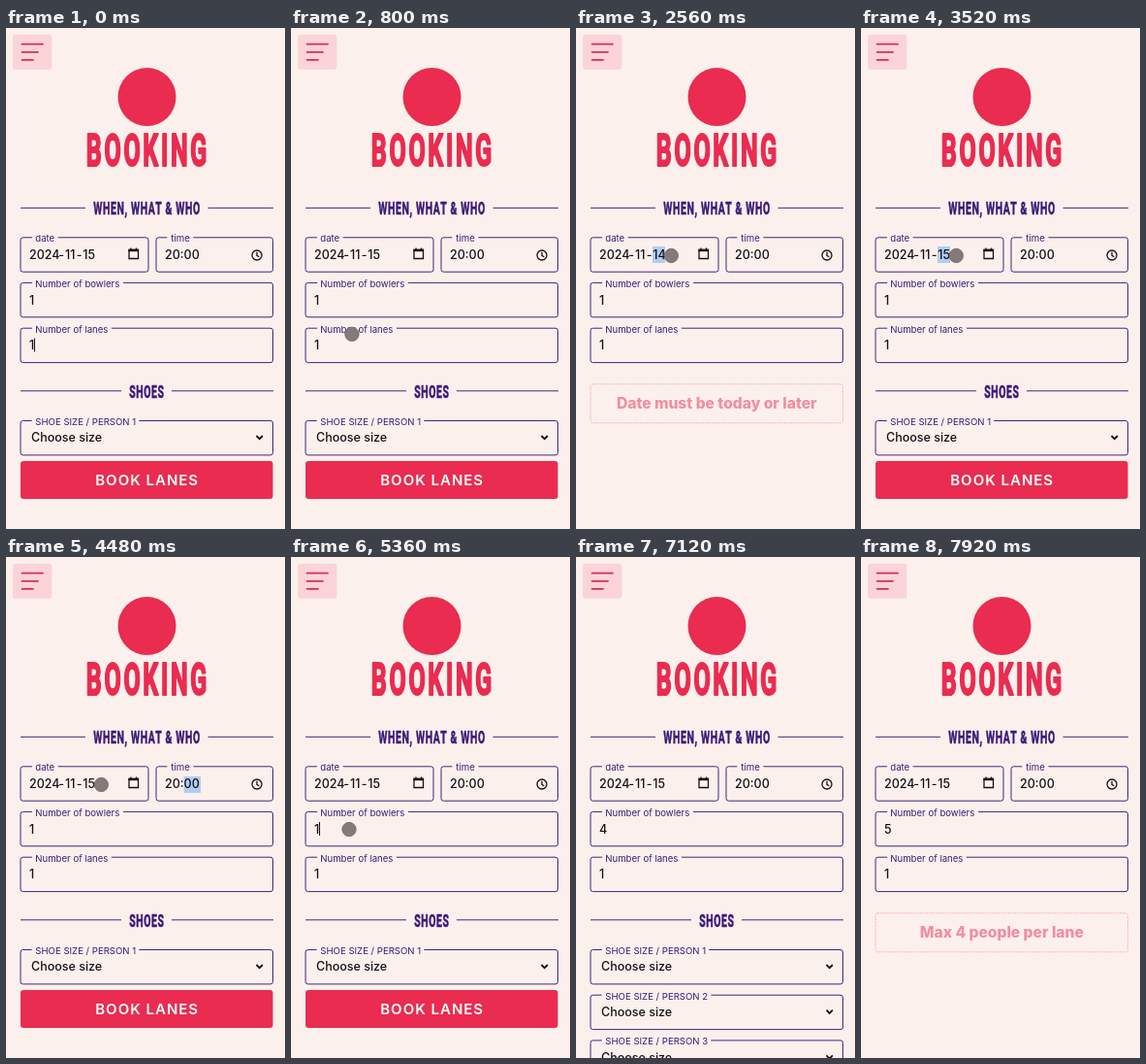
Write an HTML page that moves like this. It is 288 px wide and 516 px high and loops after 8 s.

```html
<!DOCTYPE html>
<html lang="en">
<head>
<meta charset="utf-8">
<title>Booking form</title>
<style>
  html, body { margin: 0; width: 100%; height: 100%; overflow: hidden; background: #fcf0ec; }
  svg { display: block; width: 288px; height: 516px; font-family: Inter, "Open Sans", sans-serif; }
  .heading { font-family: Roboto, "Liberation Sans", sans-serif; font-weight: 700; font-kerning: none; text-anchor: middle; }
  .heading text { vector-effect: non-scaling-stroke; stroke-linejoin: round; }
  .line { fill: none; stroke: #43237a; stroke-width: 1; }
  .label { font-size: 9.6px; fill: #3c1a78; stroke: #fcf0ec; stroke-width: 8px; paint-order: stroke; }
  .value { font-size: 12.5px; font-weight: 500; fill: #151118; }
  .icon { fill: none; stroke: #151118; stroke-width: 1.3; }
  .chevron { fill: none; stroke: #151118; stroke-width: 1.8; }
  .select { fill: #b0cdf3; }
  .button { font-size: 15px; font-weight: 600; letter-spacing: 1px; fill: #fff; text-anchor: middle; }
  .alert { font-size: 15.6px; font-weight: 800; fill: #f18ea0; text-anchor: middle; }
</style>
</head>
<body>
<svg id="stage" viewBox="0 0 288 516"></svg>
<script>
const RED = '#e92c50', PURPLE = '#3c1a78', LOOP = 8000;
const stage = document.getElementById('stage');

function add(parent, tag, attrs = {}, text = '') {
  const el = document.createElementNS('http://www.w3.org/2000/svg', tag);
  for (const key in attrs) el.setAttribute(key, attrs[key]);
  el.textContent = text;
  parent.appendChild(el);
  return el;
}
const group = (parent, attrs) => add(parent, 'g', attrs);
const path = (parent, d, attrs) => add(parent, 'path', { d, ...attrs });
const text = (parent, x, y, str, cls) => add(parent, 'text', { x, y, class: cls }, str);
const show = (el, on) => el.setAttribute('visibility', on ? 'visible' : 'hidden');

// Tall condensed headings
function heading(parent, x, y, str, style) {
  const g = group(parent, { class: 'heading', transform: `translate(${x} ${y}) scale(.55 1)` });
  add(g, 'text', style, str);
}
const TITLE = { 'font-size': 45.5, 'letter-spacing': 4.9, fill: RED, stroke: RED, 'stroke-width': 1.7 };
const SECTION = { 'font-size': 19, 'letter-spacing': 1.1, fill: PURPLE, stroke: PURPLE, 'stroke-width': 0.5 };

function divider(parent, y, left, right) {
  path(parent, `M15 ${y}H${left}M${right} ${y}H276`, { class: 'line' });
}

function field(parent, x, y, width, label) {
  add(parent, 'rect', { x, y, width, height: 35.4, rx: 2.5, class: 'line' });
  text(parent, x + 15.3, y + 4.3, label, 'label');
}

function drawHeader() {
  add(stage, 'rect', { width: 288, height: 516, fill: '#fcf0ec' });
  add(stage, 'rect', { x: 7, y: 6.8, width: 40.3, height: 36, rx: 3, fill: '#fad4d6' });
  path(stage, 'M16.5 16.7H38M16.5 24.8H33M16.5 32.8H28', { stroke: '#d62e58', 'stroke-width': 1.7, 'stroke-linecap': 'round' });
  add(stage, 'circle', { cx: 145.5, cy: 71, r: 30, fill: RED });
  heading(stage, 146.4, 142.2, 'BOOKING', TITLE);
  heading(stage, 145.6, 191.8, 'WHEN, WHAT & WHO', SECTION);
  divider(stage, 185.3, 82, 208.5);
}

function drawIcons() {
  const g = group(stage, { class: 'icon' });
  path(g, 'M127 228.5H136.500V237.500H127Z');
  path(g, 'M126.500 229H137', { 'stroke-width': 2.4 });
  path(g, 'M129 226.500V229M134.500 226.500V229');
  add(g, 'circle', { cx: 259, cy: 234, r: 5 });
  path(g, 'M259 230.800V234.300L261.300 235.700');
}

function drawShoe(parent, i) {
  const y = 404.5 + 46.7 * i;
  field(parent, 15, y, 260.5, `SHOE SIZE / PERSON ${i + 1}`);
  text(parent, 26, y + 21.8, 'Choose size', 'value');
  path(parent, `M258.500 ${y + 15.5}l3.200 3.200l3.200 -3.200`, { class: 'chevron' });
}

drawHeader();
const daySelect = add(stage, 'rect', { x: 79, y: 225, width: 13, height: 17, class: 'select' });
const minuteSelect = add(stage, 'rect', { x: 183.5, y: 226, width: 17.5, height: 17, class: 'select' });
field(stage, 15, 215.8, 132, 'date');
field(stage, 155, 215.8, 120.5, 'time');
field(stage, 15, 262.4, 260.5, 'Number of bowlers');
field(stage, 15, 309.2, 260.5, 'Number of lanes');
drawIcons();

text(stage, 24, 237.7, '2024', 'value');
text(stage, 54.3, 237.7, '-', 'value');
text(stage, 61, 237.7, '11', 'value');
text(stage, 72.8, 237.7, '-', 'value');
const day = text(stage, 79.3, 237.7, '15', 'value');
text(stage, 164, 238.4, '20:00', 'value');
const bowlers = text(stage, 24, 284.5, '1', 'value');
text(stage, 24, 331.3, '1', 'value');

const form = group(stage);
heading(form, 145.3, 380.5, 'SHOES', SECTION);
divider(form, 373.8, 119, 171);
const shoes = [0, 1, 2, 3].map(i => {
  const g = group(form);
  drawShoe(g, i);
  return g;
});
const button = group(form);
add(button, 'rect', { x: 15, y: 446, width: 260.5, height: 39, rx: 3, fill: RED });
text(button, 145.7, 471, 'BOOK LANES', 'button');

const alertBox = group(stage);
add(alertBox, 'rect', {
  x: 15, y: 366.8, width: 260.5, height: 40, rx: 2.5,
  fill: 'none', stroke: '#f3a0b0', 'stroke-dasharray': '1.2 1.2'
});
const alertText = text(alertBox, 145.3, 392.3, '', 'alert');

const caret = add(stage, 'rect', { width: 1, height: 14, fill: '#151118' });
const pointer = add(stage, 'circle', { r: 7.2, fill: '#85797b', stroke: '#70666a', 'stroke-width': 0.8 });

// Each step: start time, value
const bowlerSteps = [[0, 1], [5600, 2], [6080, 3], [6560, 4], [7360, 5]];
const SELECT_DAY = 1200, DAY_BACK = 2320, DAY_FORTH = 3200, SELECT_MINUTE = 4160, FOCUS_BOWLERS = 5280;

const between = (t, from, to) => t >= from && t < to;
function ease(t, from, to) {
  const k = Math.min(1, Math.max(0, (t - from) / (to - from)));
  return k * k * (3 - 2 * k);
}

function updateCaret(t, count, changed) {
  const inBowlers = t >= FOCUS_BOWLERS;
  const since = inBowlers ? t - Math.max(FOCUS_BOWLERS, changed) : t;
  caret.setAttribute('x', count === 1 ? 29 : 31);
  caret.setAttribute('y', inBowlers ? 273 : 319.5);
  show(caret, (inBowlers || t < SELECT_DAY) && since % 1000 < 500);
}

function updatePointer(t) {
  const arrive = ease(t, 720, SELECT_DAY), leave = ease(t, 4960, FOCUS_BOWLERS);
  pointer.setAttribute('cx', 60 + 38.3 * (arrive - leave));
  pointer.setAttribute('cy', 322 - 87.5 * arrive + 46 * leave);
  show(pointer, between(t, 720, 5440));
}

function update(t) {
  const [changed, count] = bowlerSteps.filter(step => step[0] <= t).pop();
  const tooEarly = between(t, DAY_BACK, DAY_FORTH), tooMany = count > 4;
  day.textContent = tooEarly ? '14' : '15';
  bowlers.textContent = count;
  show(daySelect, between(t, SELECT_DAY, SELECT_MINUTE));
  show(minuteSelect, between(t, SELECT_MINUTE, FOCUS_BOWLERS));

  const blocked = tooEarly || tooMany;
  form.setAttribute('display', blocked ? 'none' : 'inline');
  show(alertBox, blocked);
  alertText.textContent = tooMany ? 'Max 4 people per lane' : 'Date must be today or later';
  shoes.forEach((shoe, i) => show(shoe, i < count));
  button.setAttribute('transform', `translate(0 ${46.7 * (count - 1)})`);

  updateCaret(t, count, changed);
  updatePointer(t);
}

const start = performance.now();
function tick() {
  update((performance.now() - start) % LOOP);
  requestAnimationFrame(tick);
}
tick();
</script>
</body>
</html>
```
